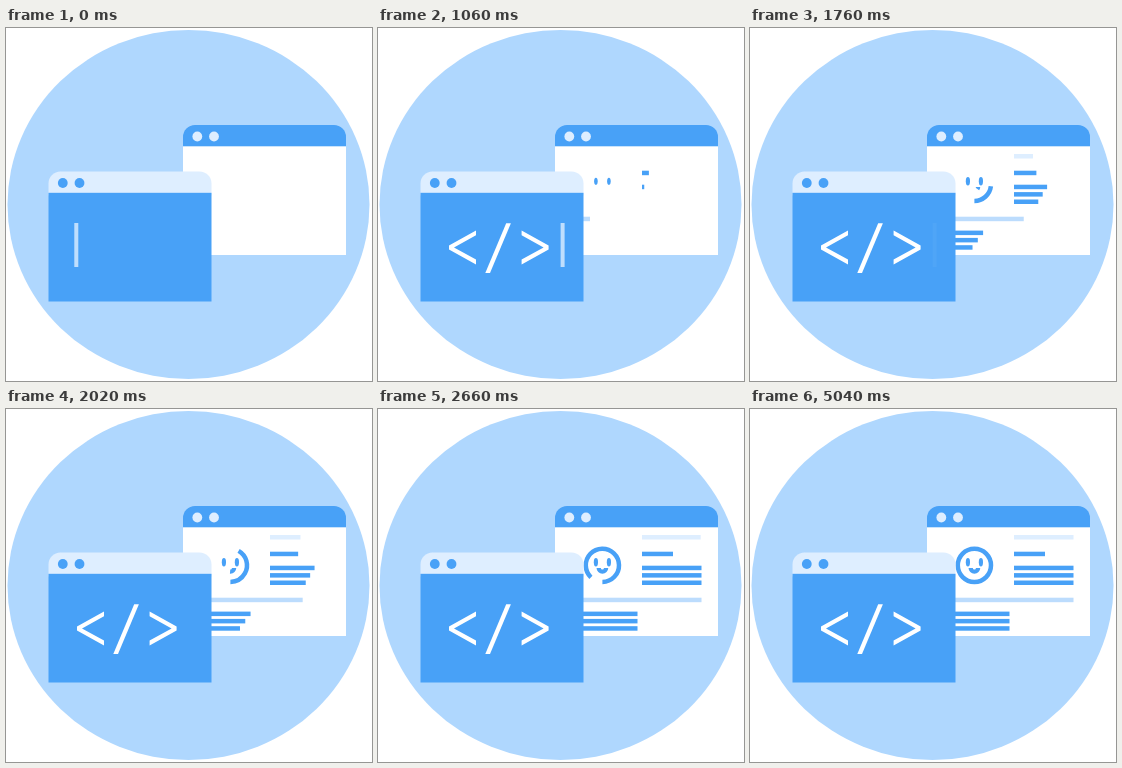
Write an HTML page with a canvas that moves like this. It is 366 px wide and 353 px high and loops after 5240 ms.

```html
<!DOCTYPE html>
<html lang="en">
<head>
<meta charset="utf-8">
<title>Code to page</title>
<style>
  html, body { margin: 0; width: 100%; height: 100%; overflow: hidden; background: #fff; }
  canvas { display: block; width: 366px; height: 353px; }
</style>
</head>
<body>
<canvas id="stage" width="366" height="353"></canvas>
<script>
const ctx = document.getElementById('stage').getContext('2d');
const LOOP = 5240;
const BLUE = '#48a1f7', SKY = '#afd7fe', PALE = '#deeeff', RULE = '#bcdcfd', WHITE = '#fff';

// Steady progress from 0 to 1.
const grow = (t, start, time = 1350) => Math.min(1, Math.max(0, (t - start) / time));

function rect(x, y, w, h, color) {
  ctx.fillStyle = color;
  ctx.fillRect(x, y, w, h);
}

function oval(x, y, rx, ry, color) {
  ctx.fillStyle = color;
  ctx.beginPath();
  ctx.ellipse(x, y, rx, ry, 0, 0, Math.PI * 2);
  ctx.fill();
}

function arc(x, y, r, from, to, width) {
  if (from === to) return;
  ctx.strokeStyle = BLUE;
  ctx.lineWidth = width;
  ctx.beginPath();
  ctx.arc(x, y, r, from, to);
  ctx.stroke();
}

function shape(...points) {
  ctx.fillStyle = WHITE;
  ctx.beginPath();
  points.forEach(([x, y]) => ctx.lineTo(x, y));
  ctx.fill();
}

function panel(x, y, bar, dots, body) {
  ctx.fillStyle = bar;
  ctx.beginPath();
  ctx.roundRect(x, y, 163, 24, [12, 12, 0, 0]);
  ctx.fill();
  rect(x, y + 21.3, 163, 108.7, body);
  for (const dx of [14.3, 31]) oval(x + dx, y + 11.5, 4.9, 4.9, dots);
}

function drawText(t) {
  const line = (x, y, w, color = BLUE) => rect(x, y, w, 4.5, color);
  const width = 59.5;
  line(264, 126, width * grow(t, 1330), PALE);
  line(264, 142.7, 31 * grow(t, 750, 1400));
  line(200, 188.7, 123.5 * grow(t, 925, 1400), RULE);
  for (let i = 0; i < 3; i++) {
    line(264, 156.7 + i * 7.4, width * grow(t, 1010 + i * 100));
    line(200, 202.6 + i * 7.3, width * grow(t, 1010 + i * 120));
  }
}

function drawFace(t) {
  const x = 224.4;
  const eye = grow(t, 780, 330);
  for (const side of [-1, 1]) oval(x + side * 6.5, 153.3, 2.1 * eye, 4.2 * eye, BLUE);

  arc(x, 158.9, 3.7, 0, Math.PI * grow(t, 1600, 800), 4.3);

  // The ring grows from its lowest point, up the right side and over the top.
  const low = Math.PI / 2;
  arc(x, 156.3, 16.6, low - Math.PI * 2 * grow(t, 1440, 1390), low, 4.5);
}

function chevron(tip, end) {
  const y = 219.4, inner = tip + Math.sign(end - tip) * 5;
  shape([end, y - 17], [tip, y - 2], [tip, y + 2], [end, y + 17],
    [end, y + 12.1], [inner, y], [end, y - 12.1]);
}

function drawCode(t) {
  const typed = Math.min(3, Math.max(0, Math.floor((t - 80) / 260)));
  if (typed > 0) chevron(71, 98);
  if (typed > 1) shape([128.2, 195.3], [132.9, 195.3], [112, 244.9], [107.3, 244.9]);
  if (typed > 2) chevron(170.6, 143.6);

  ctx.globalAlpha = 0.8 * (1 - grow(t, 1100, 700));
  rect(68.3 + typed * 38.1, 195, 4, 44, PALE);
  ctx.globalAlpha = 1;
}

function draw(t) {
  rect(0, 0, 366, 353, WHITE);
  oval(182.5, 176.5, 181, 174.5, SKY);
  panel(177, 97, BLUE, PALE, WHITE);
  drawText(t);
  drawFace(t);
  panel(42.5, 143.5, PALE, BLUE, BLUE);
  drawCode(t);
}

function tick() {
  draw(performance.now() % LOOP);
  requestAnimationFrame(tick);
}
tick();
</script>
</body>
</html>
```
